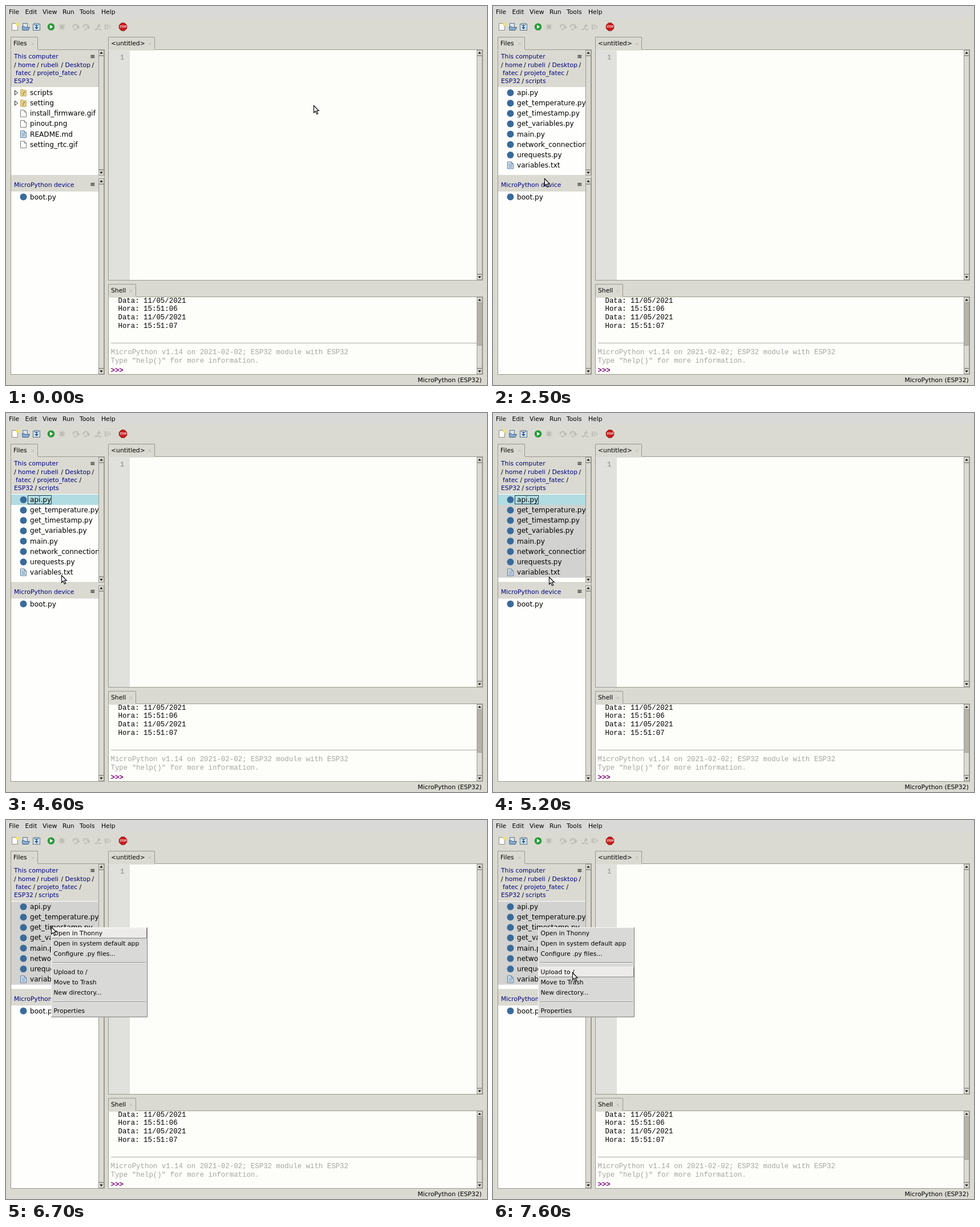
An HTML page with a canvas for the animation above (8000 ms loop, 843 by 664 pixels).

```html
<!DOCTYPE html>
<html lang="en">
<head>
<meta charset="utf-8">
<title>File manager and shell</title>
<style>
html, body { margin: 0; width: 100%; height: 100%; overflow: hidden; background: #dadad2; }
canvas { display: block; }
</style>
</head>
<body>
<canvas id="stage" width="843" height="664"></canvas>
<script>
const ctx = document.getElementById('stage').getContext('2d');
const LOOP = 8000;
const BG = '#dadad2', EDGE = '#9b998f', NAVY = '#000080', GREY = '#a5a5a2', PAPER = '#fdfef9';
const UI = '10.8px "DejaVu Sans", sans-serif';
const TREE = '12.1px "DejaVu Sans", sans-serif';
const MONO = '12.4px "Liberation Mono", monospace';
const ROW = 18.15;

const FOLDER_VIEW = [['scripts', 'folder'], ['setting', 'folder'], ['install_firmware.gif', 'page'],
  ['pinout.png', 'page'], ['README.md', 'text'], ['setting_rtc.gif', 'page']];
const SCRIPTS_VIEW = [['api.py', 'python'], ['get_temperature.py', 'python'], ['get_timestamp.py', 'python'],
  ['get_variables.py', 'python'], ['main.py', 'python'], ['network_connection.py', 'python'],
  ['urequests.py', 'python'], ['variables.txt', 'text']];
const MENU = [['Open in Thonny', 198], ['Open in system default app', 216], ['Configure .py files...', 234],
  ['Upload to /', 266], ['Move to Trash', 284], ['New directory...', 302], ['Properties', 334.5]];

// Pointer strokes: first step, last step, bend x/y, end x/y
const STROKES = [
  [100, 100, 538, 170, 537, 168],
  [400, 1100, -90, 274, 40, 159],
  [1300, 1400, 52, 162, 65, 156],
  [2200, 2500, 124, 230, 90, 302],
  [2900, 3500, 90, 215, 58, 150],
  [3900, 4100, 86, 195, 93, 255],
  [4300, 4600, 96, 270, 97, 284],
  [4800, 4900, 98, 285, 98, 287],
  [5800, 6000, 96, 265, 88, 240],
  [6200, 6200, 84, 210, 79, 187],
  [6800, 7100, 92, 250, 125, 277],
  [7300, 7600, 134, 275, 139, 267]
];

function rect(x, y, w, h, fill, stroke) {
  if (fill) { ctx.fillStyle = fill; ctx.fillRect(x, y, w, h); }
  if (stroke) { ctx.strokeStyle = stroke; ctx.lineWidth = 1; ctx.strokeRect(x + .5, y + .5, w - 1, h - 1); }
}
function path(points, fill, stroke, closed = true, width = 1) {
  ctx.beginPath();
  for (let i = 0; i < points.length; i += 2) ctx.lineTo(points[i], points[i + 1]);
  if (closed) ctx.closePath();
  if (fill) { ctx.fillStyle = fill; ctx.fill(); }
  if (stroke) { ctx.strokeStyle = stroke; ctx.lineWidth = width; ctx.stroke(); }
}
function circle(x, y, r, fill) {
  ctx.beginPath();
  ctx.arc(x, y, r, 0, 7);
  ctx.fillStyle = fill;
  ctx.fill();
}
function text(str, x, y, font = UI, color = '#000') {
  ctx.font = font;
  ctx.fillStyle = color;
  ctx.fillText(str, x, y);
}
function clipped(x, y, w, h, draw) {
  ctx.save();
  ctx.beginPath();
  ctx.rect(x, y, w, h);
  ctx.clip();
  draw();
  ctx.restore();
}

function tab(label, x, y, w) {
  rect(x, y, w, 24, BG);
  path([x + .5, y + 23, x + .5, y + .5, x + w - .5, y + .5, x + w - .5, y + 22], null, EDGE, false);
  text(label, x + 5, y + 15);
  text('×', x + w - 13, y + 14.5, '9px "DejaVu Sans", sans-serif', '#bcbcb6');
}
function scrollbar(x, y, h, thumbTop = y + 10) {
  rect(x, y, 10, h, '#b7b3a8', EDGE);
  rect(x, thumbTop, 10, y + h - 10 - thumbTop, BG, EDGE);
  [[y, -1], [y + h - 10, 1]].forEach(([top, dir]) => {
    rect(x, top, 10, 10, BG, EDGE);
    const mid = top + 5;
    path([x + 2.2, mid - dir * 1.6, x + 7.8, mid - dir * 1.6, x + 5, mid + dir * 2], '#111');
  });
}

function icon(kind, x, y) {
  if (kind === 'python') return circle(x, y, 6, '#396b9a');
  if (kind === 'folder') {
    path([x - 5, y - 6, x - 1, y - 6, x, y - 4.5, x + 5, y - 4.5, x + 5, y + 6, x - 5, y + 6], '#e3cd86', '#cdb56b');
    path([x + 2, y - 3, x, y + 1, x - 1, y + 5], null, '#9a8145', false);
    path([x - 1, y, x + 4, y - 1], null, '#b39a57', false);
    return;
  }
  const blue = kind === 'text';
  path([x - 5, y - 6, x + 1.5, y - 6, x + 5, y - 2.5, x + 5, y + 6, x - 5, y + 6],
    blue ? '#dce8f2' : '#fff', blue ? '#57799b' : '#777');
  path([x + 1.5, y - 6, x + 1.5, y - 2.5, x + 5, y - 2.5], null, blue ? '#57799b' : '#777', false);
  if (blue) for (let i = 0; i < 4; i++) rect(x - 3, y - 3 + i * 2, i ? 6 : 3, 1, '#6e92b5');
}
function treeRow(name, kind, y) {
  icon(kind, 30.5, y);
  text(name, 42, y + 4, TREE);
  if (kind === 'folder') path([15.5, y - 4, 20.5, y, 15.5, y + 4], '#fff', '#222');
}

function toolbar() {
  const pale = '#bdbdb5';
  path([10.5, 30.5, 20.5, 30.5, 20.5, 42.5, 10.5, 42.5], '#fff', '#8d8d86');
  circle(20, 32, 2.8, '#f4e45a');
  rect(29, 30, 9, 9, '#dde4ea', '#5c7187');
  path([29, 42.5, 28.5, 36, 32, 36, 33, 37.5, 41.5, 37.5, 39, 42.5], '#86aed2', '#3f5f80');
  rect(47, 31, 13, 12, '#dbe4ea', '#55718b');
  rect(50, 30, 7, 4, '#fff', '#55718b');
  path([53.5, 32, 53.5, 39], null, '#24649c', false, 2);
  path([50, 37, 57, 37, 53.5, 41], '#24649c');
  circle(79, 36.5, 6.3, '#279b37');
  path([77, 33, 82.3, 36.5, 77, 40], '#fff');
  circle(98, 36.5, 3.3, pale);
  for (const d of [-3, 0, 3]) path([92.5, 36.5 + d, 103.5, 36.5 + d], null, pale, false);
  path([96, 30.5, 96, 42.5], null, pale, false);
  path([100, 30.5, 100, 42.5], null, pale, false);
  for (const x of [118, 136]) {
    path([x, 38, x, 34, x + 4, 32.5, x + 8, 34, x + 8, 37], null, pale, false, 2);
    path([x + 4.5, 36, x + 12, 36, x + 8.5, 41], pale);
    rect(x + 1, 40, 5, 2, pale);
  }
  path([155, 41, 159, 41, 163, 35], null, pale, false, 2);
  path([159.5, 36, 163, 31, 166.5, 36], pale);
  rect(162, 40, 5, 2, pale);
  rect(173, 32, 2, 9, pale);
  path([177, 32, 184, 36.5, 177, 41], '#d2d2ca', pale);
  const octagon = [];
  for (let i = 0; i < 8; i++) {
    const a = (i + .5) * Math.PI / 4;
    octagon.push(205 + 7.3 * Math.cos(a), 36.5 + 7.3 * Math.sin(a));
  }
  path(octagon, '#cb1b1b', '#8d2222');
  text('STOP', 199.4, 38.4, 'bold 4.6px "Noto Sans", sans-serif', '#fff');
}

function breadcrumbs(inScripts) {
  const links = [['This computer', 14, 92], ['home', 21, 106.5], ['rubeli', 61, 106.5], ['Desktop', 103.5, 106.5],
    ['fatec', 17, 120.5], ['projeto_fatec', 54.5, 120.5], ['ESP32', 14, 134.5]];
  const slashes = [[14, 106.5], [54, 106.5], [96.5, 106.5], [150.5, 106.5], [47.5, 120.5], [128.5, 120.5]];
  if (inScripts) {
    links.push(['scripts', 57, 134.5]);
    slashes.push([50.5, 134.5]);
  }
  links.forEach(([name, x, y]) => text(name, x, y, UI, NAVY));
  slashes.forEach(([x, y]) => text('/', x, y));
}

function filesPane(t) {
  const inScripts = t >= 1700, menuOpen = t >= 6300;
  rect(8, 76, 165, 570, BG, EDGE);
  tab('Files', 8, 54, 48);
  breadcrumbs(inScripts);
  text('≡', 147.2, 91.5);
  rect(9, 142, 153, 154, '#fefefd');
  clipped(9, 142, 153, 154, () => {
    const rows = inScripts ? SCRIPTS_VIEW : FOLDER_VIEW;
    const selected = (t >= 1500 && t < 1700) || t >= 3600;
    if (t >= 5200) rect(9, 161, 153, 127.5, '#d2d2d0');
    if (selected) {
      rect(9, 143, 153, 18, menuOpen ? '#d2d2d0' : '#b0dce2');
      if (!menuOpen) rect(38, 144, inScripts ? 42 : 48, 16, null, '#26484e');
    }
    rows.forEach(([name, kind], i) => treeRow(name, kind, 152 + i * ROW));
  });
  scrollbar(162, 77, 220);
  text('MicroPython device', 14, 316.5, UI, NAVY);
  text('≡', 147.2, 316);
  rect(9, 325, 153, 320, '#fefefd');
  treeRow('boot.py', 'python', 334.5);
  scrollbar(162, 302, 343);
}

function editorPane() {
  rect(179, 76, 657, 405, PAPER, EDGE);
  tab('<untitled>', 179, 54, 82);
  rect(180, 77, 37, 403, '#e0e0dc');
  text('1', 200, 94, 'bold ' + MONO, GREY);
  scrollbar(825, 77, 403);
}

function shellPane() {
  rect(179, 509, 657, 137, PAPER, EDGE);
  tab('Shell', 179, 487, 49);
  clipped(180, 510, 645, 135, () => {
    ['Data: 11/05/2021', 'Hora: 15:51:06', 'Data: 11/05/2021', 'Hora: 15:51:07']
      .forEach((line, i) => text(line, 196.5, 519.5 + i * 14.8, MONO));
    rect(184, 590, 641, 1, '#a9a9a6');
    text('MicroPython v1.14 on 2021-02-02; ESP32 module with ESP32', 183.5, 610, MONO, GREY);
    text('Type "help()" for more information.', 183.5, 625, MONO, GREY);
    text('>>>', 183.5, 642, 'bold ' + MONO, '#7f007f');
  });
  scrollbar(825, 510, 135, 594);
}

function raised(x, y, w, h, fill) {
  rect(x, y, w, h, fill);
  path([x + .5, y + h, x + .5, y + .5, x + w, y + .5], null, '#f7f7f4', false);
  path([x + w - .5, y, x + w - .5, y + h - .5, x, y + h - .5], null, '#7d7d78', false);
}
function popup(t, pointerY) {
  raised(79, 188, 169, 157.5, '#d9d9d7');
  for (const y of [249, 318]) {
    rect(82, y, 163, 1, '#8e8e89');
    rect(82, y + 1, 163, 1, '#f4f4f1');
  }
  if (t >= 6700) {
    const active = MENU.find(([, y]) => Math.abs(Math.max(pointerY, 190) - y) <= 9);
    if (active) raised(80, active[1] - 8.5, 167, 18, '#ecebe9');
  }
  MENU.forEach(([label, y]) => text(label, 83.5, y + 3.7));
}

function pointerAt(t) {
  let x = 539, y = 174;
  for (const [first, last, bx, by, ex, ey] of STROKES) {
    if (t < first) break;
    const steps = (last - first) / 100 + 1;
    const u = Math.min(1, (Math.floor((t - first) / 100) + 1) / steps);
    const bend = (a, b, c) => (1 - u) ** 2 * a + 2 * u * (1 - u) * b + u * u * c;
    x = bend(x, bx, ex);
    y = bend(y, by, ey);
    if (u < 1) break;
  }
  return [Math.round(x), Math.round(y)];
}
function pointer(x, y) {
  ctx.save();
  ctx.translate(x + .5, y + .5);
  path([0, 0, 0, 12.5, 2.8, 9.8, 5, 15, 7.2, 14, 5, 9, 8.7, 9], '#fff', '#111', true, 1.2);
  ctx.restore();
}

function draw(t) {
  rect(0, 0, 843, 664, BG);
  rect(0, 0, 843, 20, '#d9d9d7');
  [['File', 5], ['Edit', 33.5], ['View', 64], ['Run', 99], ['Tools', 129], ['Help', 167]]
    .forEach(([label, x]) => text(label, x, 14));
  toolbar();
  filesPane(t);
  editorPane();
  shellPane();
  text('MicroPython (ESP32)', 721.5, 658.5);
  const [x, y] = pointerAt(t);
  if (t >= 6300) popup(t, y);
  pointer(x, y);
}

function frame() {
  draw(performance.now() % LOOP);
  requestAnimationFrame(frame);
}
frame();
</script>
</body>
</html>
```
